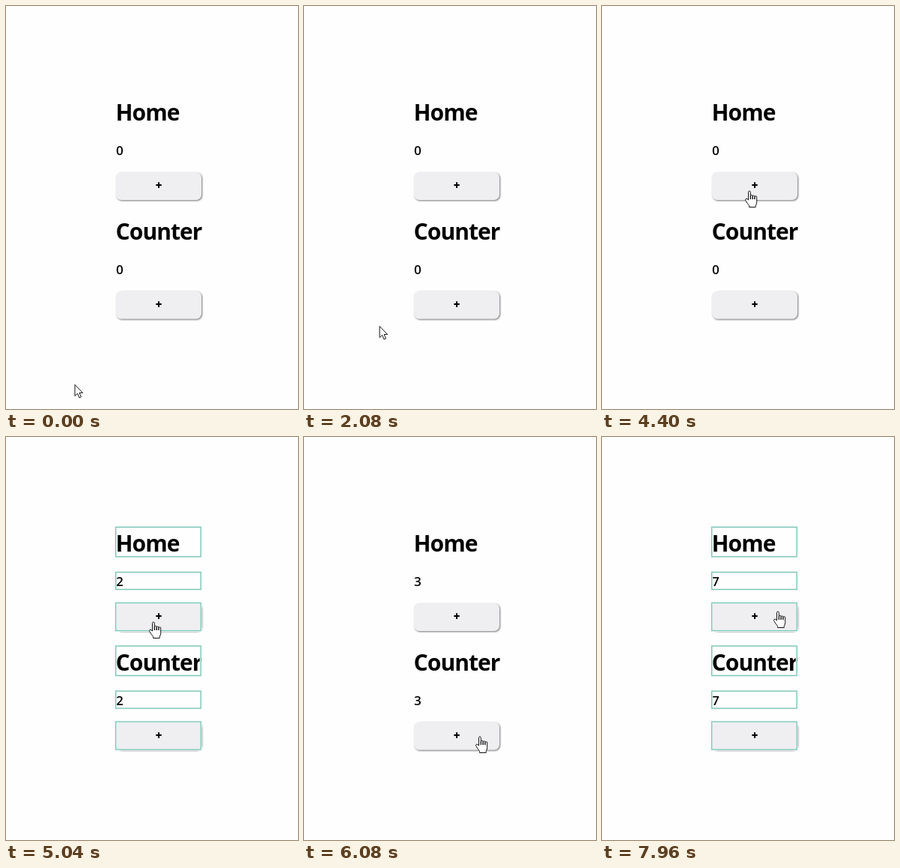
These frames come from a looping animation (390 px wide and 538 px high, 8000 ms). An HTML page:

```html
<!DOCTYPE html>
<html lang="en">
<head>
<meta charset="utf-8">
<title>Counter</title>
<style>
  html, body { margin: 0; width: 100%; height: 100%; overflow: hidden; background: #fffeff; }
  svg { position: absolute; left: 0; top: 0; display: block; }
  text { font-family: "Open Sans", "Noto Sans", sans-serif; fill: #030303; }
  .title { font-size: 30px; font-weight: 700; letter-spacing: -.95px; }
  .value { font-size: 17px; font-weight: 600; }
  .plus { font-size: 15px; font-weight: 800; text-anchor: middle; }
  .button { fill: #efeef0; filter: drop-shadow(1.7px 1.7px .9px rgba(0, 0, 0, .55)); }
  .halo { fill: none; stroke: #f3f4f4; stroke-width: 3; }
  .line { fill: none; stroke: #78c8ba; stroke-width: 1.3; }
  .cursor { fill: #fff; stroke: #111; stroke-width: 1; stroke-linejoin: round; }
</style>
</head>
<body>
<svg width="390" height="538" viewBox="0 0 390 538">
  <g id="page"></g>
  <g id="outlines"></g>
  <path id="arrow" class="cursor" d="M1 .5V15.6L4.5 12.3L6.9 18L9.4 16.9L7 11.4H11.5Z"/>
  <path id="hand" class="cursor"/>
</svg>
<script>
const LOOP = 8000;
const STEP = 40;
const FLASH = 250;

const burst = (start, count, gap) => Array.from({ length: count }, (_, i) => start + i * gap);
const clicks = [...burst(4440, 3, 430), ...burst(6220, 3, 340), 7800];

const origin = { x: 91, y: 505 };
const moves = [
  { start: 0, end: 80, x: 161, y: 463 },
  { start: 1080, end: 1880, x: 100, y: 427 },
  { start: 3400, end: 4160, x: 197, y: 247 },
  { start: 5460, end: 5860, x: 235, y: 400 },
  { start: 7140, end: 7540, x: 235, y: 233 }
];

const $ = id => document.getElementById(id);

function add(parent, tag, attrs, text = "") {
  const el = document.createElementNS("http://www.w3.org/2000/svg", tag);
  for (const key in attrs) el.setAttribute(key, attrs[key]);
  el.textContent = text;
  parent.append(el);
  return el;
}

function outline(y, height) {
  const box = { x: 146.6, y, width: 113.6, height };
  add($("outlines"), "rect", { ...box, class: "halo" });
  add($("outlines"), "rect", { ...box, class: "line" });
}

function section(title, y) {
  const page = $("page");
  add(page, "text", { class: "title", x: 146.6, y: y + 33 }, title);
  const value = add(page, "text", { class: "value", x: 147, y: y + 79 }, "0");
  add(page, "rect", { class: "button", x: 147, y: y + 102, width: 114, height: 37, rx: 7 });
  add(page, "text", { class: "plus", x: 204, y: y + 125 }, "+");
  outline(y + .3, 39.5);
  outline(y + 60.5, 23);
  outline(y + 101.5, 37);
  return value;
}

// Index finger, then three folded fingers each a little lower.
function handShape() {
  let d = "M-1.5 12";
  for (let i = 0; i < 4; i++) {
    const top = i ? 6 + i * .7 : 1.5;
    d += `V${top}a1.4 1.4 0 0 1 2.8 0V11`;
  }
  return d + "V14.5Q9.7 17 8.2 19.5V21.5H-.4V19.5Q-3 16.5-5.2 12.6C-6.2 10.7-4.2 9.4-3 10.6Z";
}

const values = [section("Home", 120), section("Counter", 278.7)];
$("hand").setAttribute("d", handShape());

const ease = u => u * u * (3 - 2 * u);

function pointer(t) {
  let { x, y } = origin;
  for (const m of moves) {
    const k = ease(Math.min(1, Math.max(0, (t - m.start) / (m.end - m.start))));
    x += (m.x - x) * k;
    y += (m.y - y) * k;
  }
  return [Math.round(x), Math.round(y)];
}

const overButton = (x, y) =>
  x > 147 && x < 261 && (y > 222 && y < 259 || y > 380 && y < 418);

function draw(now) {
  const t = Math.floor(now % LOOP / STEP) * STEP;
  const count = clicks.filter(c => c <= t).length;
  const flashing = clicks.some(c => c <= t && t < c + FLASH);
  values.forEach(v => v.textContent = count);
  $("outlines").style.display = flashing ? "" : "none";

  const [x, y] = pointer(t);
  const shown = overButton(x, y) ? "hand" : "arrow";
  for (const id of ["arrow", "hand"]) {
    $(id).setAttribute("transform", `translate(${x} ${y})`);
    $(id).style.display = id === shown ? "" : "none";
  }
}

const start = performance.now();
function tick() {
  draw(performance.now() - start);
  requestAnimationFrame(tick);
}
tick();
</script>
</body>
</html>
```
